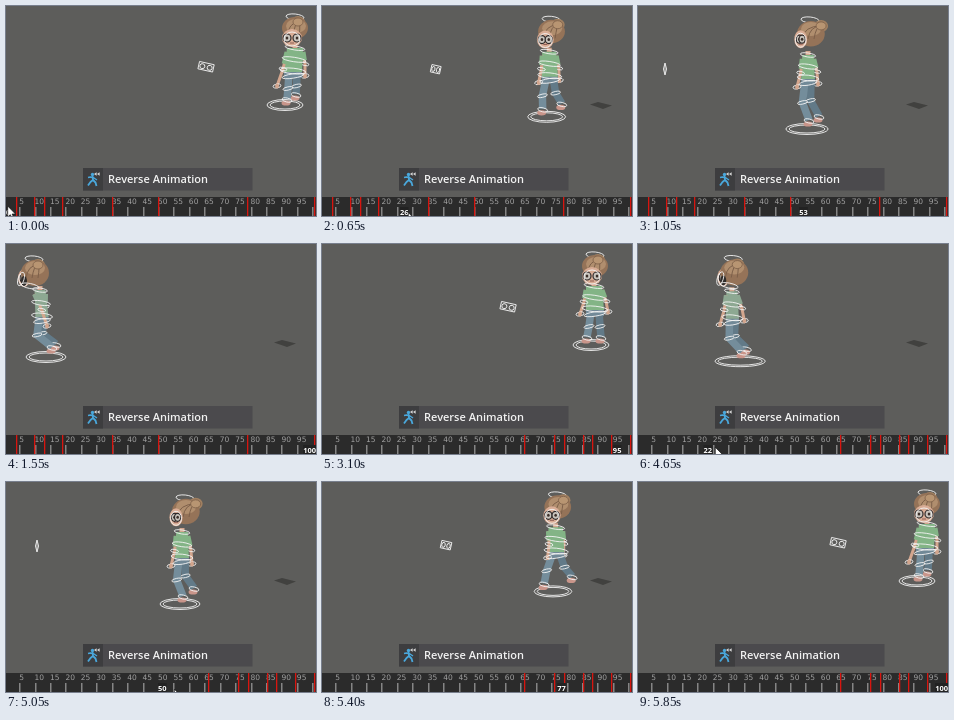
Recreate the animation shown at these times as an HTML page with a canvas. Size 310x210 px, loop 6050 ms.

```html
<!DOCTYPE html>
<html lang="en">
<head>
<meta charset="utf-8">
<title>Reverse Animation</title>
<style>
html, body { margin: 0; width: 100%; height: 100%; overflow: hidden; background: #5d5d5b; }
canvas { display: block; }
</style>
</head>
<body>
<canvas id="stage" width="310" height="210"></canvas>
<script>
const c = document.getElementById('stage').getContext('2d');
const LOOP = 6050, REVERSED_AT = 2850;

// time in ms -> frame of the time slider
const scrub = [[0, 0], [200, 0], [850, 37], [1050, 53], [1550, 100], [1900, 100], [2050, 95],
  [3300, 95], [3950, 2], [4000, 2], [4200, 4], [4650, 22], [5050, 50], [5300, 72], [5850, 100], [LOOP, 100]];
const hover = [[0, 0], [2300, 0], [2450, 1], [3000, 1], [3100, 0], [LOOP, 0]];
const keysBefore = [10, 28, 38, 56, 106, 152, 241, 308];
const keysAfter = [202, 232, 242, 261, 270, 289, 308];

// frame, yaw, ring x y rx, camera x y, then x y of head, neck, hip, feet and hands
const poses = [
  [0, 0, 279, 99, 18, 200, 61, 289, 24, 289, 42, 287, 65, 281, 97, 290, 92, 271, 80, 299, 70],
  [5, 0, 269, 101, 18, 186, 63, 273, 24, 272, 42, 273, 65, 265, 97, 279, 97, 258, 70, 286, 68],
  [50, .85, 174, 122, 20, 31, 64, 179, 29, 176, 50, 176, 75, 177, 118, 188, 110, 165, 84, 186, 82],
  [53, .9, 169, 123, 21, 27, 63, 172, 27, 170, 49, 170, 72, 171, 118, 181, 114, 159, 81, 180, 78],
  [96, 1.6, 54, 113, 28, -40, 63, 40, 28, 39, 46, 40, 75, 44, 113, 68, 104, 34, 80, 46, 76],
  [100, 1.7, 40, 113, 20, -50, 63, 28, 28, 34, 46, 36, 72, 46, 107, 50, 104, 41, 82, 37, 74]
];

const mix = (a, b, u) => a + (b - a) * u;

function span(rows, v) {
  let i = 1;
  while (i < rows.length - 1 && v > rows[i][0]) i++;
  const a = rows[i - 1], b = rows[i];
  return { a, b, u: (v - a[0]) / (b[0] - a[0]) };
}

function valueAt(rows, v) {
  const { a, b, u } = span(rows, v);
  return mix(a[1], b[1], u);
}

function poseAt(frame) {
  const { a, b, u } = span(poses, frame);
  const p = a.map((v, i) => mix(v, b[i], u));
  if (b[0] - a[0] > 10) {             // walk cycles between the poses
    const s = Math.sin(u * Math.PI * 4);
    p[13] += s * 8; p[15] -= s * 8;
    p[14] -= Math.max(0, s) * 4; p[16] -= Math.max(0, -s) * 4;
    p[17] -= s * 5; p[19] += s * 5;
  }
  return p;
}

function line(points, color, width) {
  c.beginPath();
  points.forEach(([x, y]) => c.lineTo(x, y));
  c.strokeStyle = color;
  c.lineWidth = width;
  c.stroke();
}

function poly(points, fill) {
  c.beginPath();
  points.forEach(([x, y]) => c.lineTo(x, y));
  c.closePath();
  c.fillStyle = fill;
  c.fill();
}

function oval(x, y, rx, ry, fill, stroke, width = 1, tilt = 0) {
  c.beginPath();
  c.ellipse(x, y, rx, ry, tilt, 0, Math.PI * 2);
  if (fill) { c.fillStyle = fill; c.fill(); }
  if (stroke) { c.strokeStyle = stroke; c.lineWidth = width; c.stroke(); }
}

const control = (x, y, rx, ry, tilt) => oval(x, y, rx, ry, null, '#f4f4f4', .9, tilt);

function text(s, x, y, font, color) {
  c.font = font;
  c.fillStyle = color;
  c.fillText(s, x, y);
}

function camera(x, y, frame) {
  const w = mix(15, 3, Math.max(0, Math.min(1, (frame - 5) / 45)));
  c.save();
  c.translate(x, y);
  if (w > 5) {
    c.rotate(.22);
    c.strokeStyle = '#eee';
    c.lineWidth = .9;
    c.strokeRect(-w / 2, -4, w, 7.5);
    control(-w / 4, 0, w / 6, 2.5);
    control(w / 4, 0, w / 6, 2.5);
  } else {
    line([[0, -6], [w / 2, 0], [0, 6], [-w / 2, 0], [0, -6]], '#eee', 1);
    line([[0, -4], [0, 4]], '#ddd', .8);
  }
  c.restore();
}

function leg(hx, hy, fx, fy, yaw, color) {
  const knee = [(hx + fx) / 2 - 5 * yaw, (hy + fy) / 2];
  line([[hx, hy], knee, [fx, fy - 4]], color, 7.5);
  oval(fx - 1, fy, 4.5, 2.6, '#c9958a');
  control(fx, fy - 3, 5, 2, .2);
  control(...knee, 5, 1.6, -.2);
}

function arm(x, y, hx, hy, sleeve) {
  const mid = [(x + hx) / 2 + 1, (y + hy) / 2];
  line([[x, y], mid, [hx, hy]], '#d3a68e', 3);
  line([[x, y], [mix(x, mid[0], .7), mix(y, mid[1], .7)]], sleeve, 5);
  control(...mid, 4, 1.6, .2);
  control(hx, hy, 4, 2, -.2);
  oval(hx, hy, 1.9, 2.5, '#d3a68e');
}

function head(x, y, yaw) {
  const side = Math.min(1, yaw), back = yaw > 1.3;
  const fx = x - 3 - 7 * side, fy = y + 8 - 2 * side;
  const bunX = back ? x + 4 : x + mix(3, 12, side), bunY = y - mix(8, 7, side);
  const face = () => {
    oval(fx, fy, 10 - 4 * side, 9, '#d9ad96');
    line([[fx - 2, fy + 5], [fx + 2, fy + 5]], '#8f5e55', 1);
    const gap = 5 * (1 - side * .8);
    for (const gx of [fx - gap, fx + gap]) {
      oval(gx, fy, 4 - side, 4, '#c9c4bd', '#302b2b', 1.2);
      oval(gx, fy, 1.3, 1.5, '#3c302b');
    }
    control(fx, fy + 1, 8 - 3 * side, 7);
  };
  control(x, y - 13, 9, 3, .1);
  if (back) face();
  oval(bunX, bunY, 7, 6, '#a18061');
  oval(x + side, y - 2 + 3 * side, 13 + side, 11 + 2 * side, '#957358');
  oval(x + 1, y - 4, 10, 7, '#b08e6e');
  for (const k of [-6, 0, 6]) {
    c.beginPath();
    c.moveTo(x + k - 2, y + 6);
    c.quadraticCurveTo(x + k, y - 7, bunX, bunY);
    c.strokeStyle = '#7d604a';
    c.lineWidth = 1;
    c.stroke();
  }
  oval(bunX, bunY, 5, 4, '#b89572', '#7d604a', .8);
  if (!back) face();
  else {
    oval(x - 10, y + 9, 3, 5, '#2f2b29');
    control(x - 13, y + 7, 3, 7, .3);
    control(x - 4, y + 14, 9, 2.5, .2);
  }
}

function character(p) {
  const [, yaw, rx, ry, rw, , , hx, hy, nx, ny, px, py, ax, ay, bx, by, lx, ly, mx, my] = p;
  const side = Math.min(1, yaw), half = mix(9, 6.5, side);
  const shirt = yaw > 1.3 ? '#8da892' : '#83b486';
  control(rx, ry, rw, 5.5);
  control(rx, ry, rw - 3, 4);
  if (yaw > 1.4 && rw > 22) control(rx + 18, ry, 12, 4);
  arm(nx + half - 1, ny + 4, mx, my, shirt);
  leg(px + half * .45, py + 3, bx, by, yaw, '#627a88');
  leg(px - half * .45, py + 3, ax, ay, yaw, '#748d9b');
  line([[nx, ny - 4], [nx, ny + 2]], '#d3a68e', 5);
  poly([[px - half, py - 1], [px + half, py - 1], [px + half, py + 7], [px - half, py + 7]], '#718997');
  poly([[nx - half + 1, ny], [nx + half - 1, ny], [px + half, py + 1], [px - half, py + 1]], shirt);
  arm(nx - half + 1, ny + 4, lx, ly, shirt);
  control(nx, ny, half + 1, 2, .15);
  control((nx + px) / 2, (ny + py) / 2, half + 3, 2.2, .15);
  control(px, py, half + 4, 2.8, .1);
  control(px, py + 5, half + 2, 2.2, -.15);
  head(hx, hy, yaw);
}

function button(glow) {
  const shade = (base, up) => `rgb(${base.map(v => Math.round(v + up * glow))})`;
  c.fillStyle = shade([75, 74, 77], 24);
  c.fillRect(77, 162, 169.5, 22.5);
  c.fillStyle = shade([61, 61, 63], 20);
  c.fillRect(77, 162, 20, 22.5);
  const blue = '#4aa8dc';
  oval(86.5, 168.5, 1.7, 1.7, blue);
  line([[86.5, 170], [87, 174], [84.5, 176], [82, 179.5]], blue, 1.8);
  line([[87, 174], [89.5, 176.5], [90.5, 180]], blue, 1.8);
  line([[82, 171.5], [84.5, 171], [88, 172], [91, 174]], blue, 1.4);
  for (const x of [88, 91]) poly([[x, 168], [x + 2.6, 166.2], [x + 2.6, 169.8]], '#d8d8d8');
  text('Reverse Animation', 102, 177, '600 11px "Open Sans", sans-serif', '#f2f2f2');
}

function slider(frame, keys) {
  const at = f => 3.086 * f - 2.3;
  c.fillStyle = '#2b2b2b';
  c.fillRect(0, 191, 310, 19);
  for (let f = 0; f <= 100; f += 5) {
    c.fillStyle = '#858585';
    c.fillRect(Math.round(at(f)), 201, 1.5, 9);
    if (f && f < 100) text(f, at(f), 198, '7.5px "DejaVu Sans", sans-serif', '#a0a0a0');
  }
  c.fillStyle = '#d8150f';
  for (const x of keys) c.fillRect(x, 191, 1.3, 19);
  const font = 'bold 7.5px "Open Sans", sans-serif';
  c.font = font;
  const w = c.measureText(frame).width;
  const x = Math.max(0, Math.min(at(frame), 310 - w));
  c.fillStyle = '#222';
  c.fillRect(x, 201, w, 9);
  text(frame, x, 208.5, font, '#fff');
  return at(frame);
}

function pointer(x, y) {
  c.save();
  c.translate(x, y);
  poly([[0, 0], [0, 11], [2.6, 8.7], [4.4, 12.5], [6.2, 11.6], [4.4, 8], [7.8, 8]], '#fff');
  c.strokeStyle = '#111';
  c.lineWidth = .7;
  c.stroke();
  c.restore();
}

function draw(now) {
  const t = Math.floor(now % LOOP / 50) * 50;
  const reversed = t >= REVERSED_AT;
  const frame = Math.round(valueAt(scrub, t));
  const shown = reversed ? 100 - frame : frame;
  const p = poseAt(shown);
  c.lineJoin = 'round';
  c.fillStyle = '#5d5d5b';
  c.fillRect(0, 0, 310, 210);
  if (shown > 8) poly([[268, 98.5], [276, 96], [290, 99.5], [281, 103]], '#41413f');
  camera(p[5], p[6], shown);
  character(p);
  button(valueAt(hover, t));
  const x = slider(frame, reversed ? keysAfter : keysBefore);
  if (t < 1000) pointer(x + 4 + frame / 6, 200 + frame / 4);
  if (t >= 3800 && t < 5300) pointer(x + 8 + frame / 6, 200 + frame / 7);
}

function tick(now) {
  draw(now);
  requestAnimationFrame(tick);
}
draw(0);
requestAnimationFrame(tick);
</script>
</body>
</html>
```
